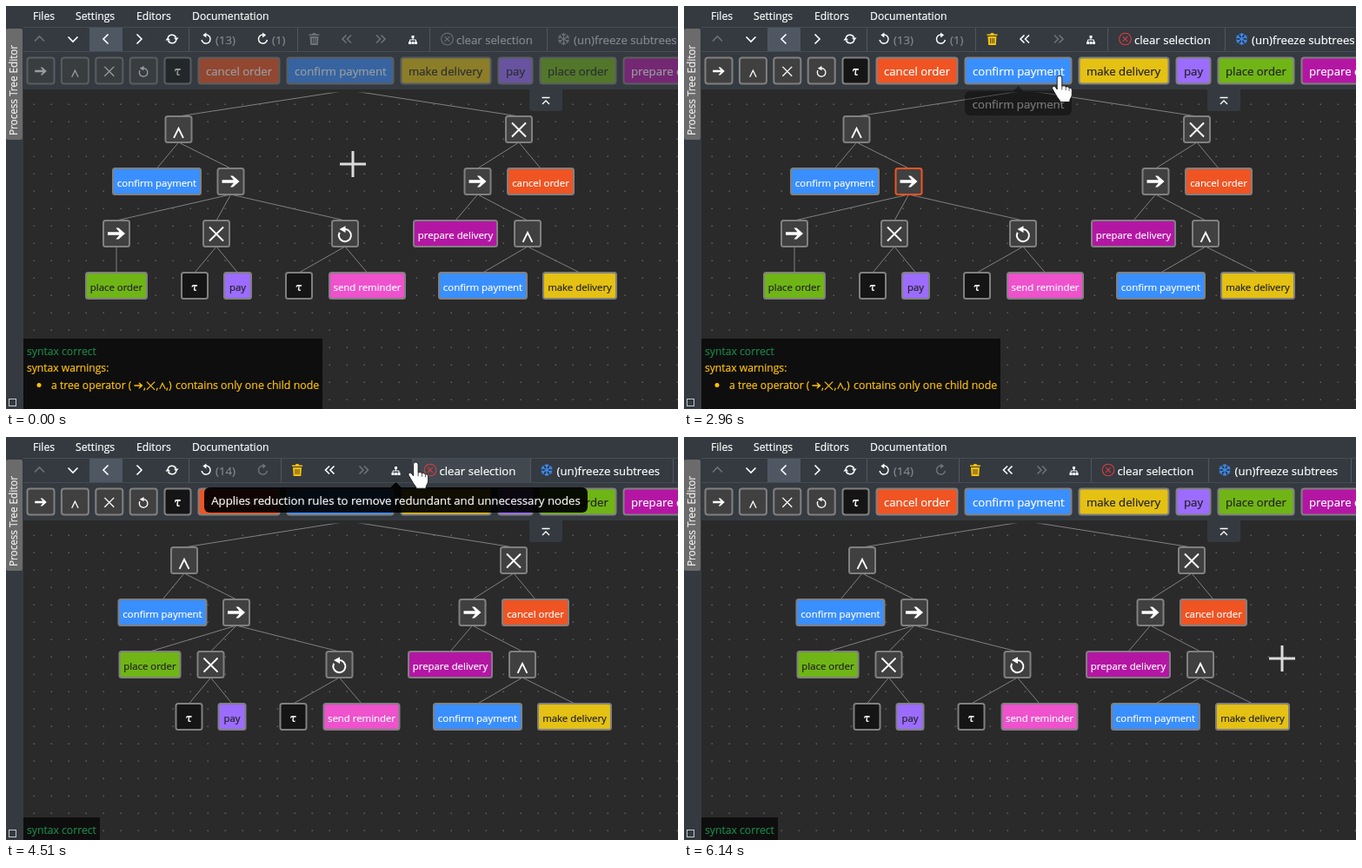
An HTML page for the animation above (7.19 s loop, 773 by 464 pixels).

```html
<!DOCTYPE html>
<html lang="en">
<head>
<meta charset="utf-8">
<title>Process Tree Editor</title>
<style>
html, body { margin: 0; width: 100%; height: 100%; overflow: hidden; background: #2a2a2a; }
svg { display: block; width: 773px; height: 464px; font-family: 'Open Sans', 'Noto Sans', sans-serif; }
</style>
</head>
<body>
<svg id="stage" viewBox="0 0 773 464" xmlns="http://www.w3.org/2000/svg"></svg>
<script>
const LOOP = 7190, STEP = 70;
const CUES = [0, 200, 1400, 1670, 2540, 4310, 4510, 5650];
const BAR = '#343a40', LIT = '#4f5862', GREY = '#808080', DIM = '#6d7277';
const stage = document.getElementById('stage');

// label: [fill, text colour, node width, toolbar x, toolbar width]
const TASKS = {
  'cancel order': ['#f05423', '#fff', 76, 221, 94],
  'confirm payment': ['#3a8fff', '#fff', 101, 323, 123],
  'make delivery': ['#e4c113', '#222', 84, 454, 104],
  'pay': ['#9c6cff', '#222', 31, 566, 40],
  'place order': ['#70b516', '#222', 70, 614, 88],
  'prepare delivery': ['#b416a4', '#fff', 96, 710, 120],
  'send reminder': ['#ee52cc', '#fff', 87]
};

const clamp = v => Math.max(0, Math.min(1, v));
const ramp = (t, a, b) => clamp((t - a) / (b - a));
const mix = (a, b, k) => a + (b - a) * k;
const ease = p => { const q = Math.pow(clamp(p), 0.85); return q * q * (3 - 2 * q); };

const rect = (x, y, w, h, fill, more = '') =>
  `<rect x="${x}" y="${y}" width="${w}" height="${h}" fill="${fill}" ${more}/>`;
const text = (s, x, y, size, fill = '#fff', more = '') =>
  `<text x="${x}" y="${y}" font-size="${size}" fill="${fill}" stroke="${fill}" stroke-width=".2" ${more}>${s}</text>`;
const mid = 'text-anchor="middle"';
const at = (x, y, body, s = 1) => `<g transform="translate(${x} ${y}) scale(${s})">${body}</g>`;
const line = (d, c, w = 1.6) => `<path d="${d}" fill="none" stroke="${c}" stroke-width="${w}"/>`;
const solid = (d, c) => `<path d="${d}" fill="${c}"/>`;
const fade = (o, body) => o > 0 ? `<g opacity="${o}">${body}</g>` : '';

const OPS = {
  seq: c => solid('M-10-1.7H3.4L-.6-6.5H2.6L10 0L2.6 6.5H-.6L3.4 1.7H-10z', c),
  xor: c => line('M-8-7.5L8 8.5M8-7.5L-8 8.5', c, 1.9),
  and: c => line('M-5.4 9.8L0-1.2L5.4 9.8', c, 1.9),
  loop: c => line('M-6.3-1.2A7 7 0 1 0 0-4.9', c, 2) + solid('M-6.5-4.9L.5-8.8V-1z', c)
};

const ICONS = {
  up: c => line('M-5.5 2.5L0-3L5.5 2.5', c),
  down: c => line('M-5.5-2.5L0 3L5.5-2.5', c),
  left: c => line('M2.5-5.5L-3 0L2.5 5.5', c),
  right: c => line('M-2.5-5.5L3 0L-2.5 5.5', c),
  first: c => line('M-.5-4.5L-5 0L-.5 4.5M5-4.5L.5 0L5 4.5', c),
  last: c => line('M.5-4.5L5 0L.5 4.5M-5-4.5L-.5 0L-5 4.5', c),
  sync: c => line('M-4.8-1.2A5 5 0 0 1 4.6-1.6M4.8 1.2A5 5 0 0 1-4.6 1.6', c, 1.5) +
    solid('M2-1.5H7.6L4.8 2zM-2 1.5H-7.6L-4.8-2z', c),
  undo: c => line('M-2.2-4.4A5 5 0 1 1-4.9 1', c, 1.5) + solid('M.4-7.6V-1.4L-3.6-4.5z', c),
  redo: c => `<g transform="scale(-1 1)">${ICONS.undo(c)}</g>`,
  trash: c => solid('M-6-5.5H-2.2L-1.5-7H1.5L2.2-5.5H6V-4H-6zM-5-3H5L4.3 7H-4.3z', c) +
    line('M-2-1V5M0-1V5M2-1V5', BAR, .9),
  tree: c => line('M0-3V0M-3.5 2.5V0H3.5V2.5', c, 1) +
    [[0, -3.5], [-3.5, 3.5], [0, 3.5], [3.5, 3.5]].map(p =>
      rect(p[0] - 1.5, p[1] - 1.5, 3, 3, c)).join(''),
  clear: c => `<circle r="6.8" fill="none" stroke="${c}" stroke-width="1.1"/>` +
    line('M-2.8-2.8L2.8 2.8M2.8-2.8L-2.8 2.8', c, 1.1),
  snow: c => [0, 60, 120].map(a => `<g transform="rotate(${a})">` +
    line('M0-7V7M-2.2-6L0-3.8L2.2-6M-2.2 6L0 3.8L2.2 6', c, 1.2) + '</g>').join('')
};
const icon = (name, x, y, c = '#fff') => at(x, y, ICONS[name](c));

// --- process tree ---
function node(label, x, y, picked) {
  const task = TASKS[label], w = task ? task[2] : 30;
  const fill = task ? task[0] : label === 'τ' ? '#151515' : '#404040';
  const box = rect(x - w / 2, y - 15, w, 30, fill,
    `rx="2.5" stroke="${picked ? '#f05423' : GREY}" stroke-width="2"`);
  if (OPS[label]) return box + at(x, y, OPS[label]('#fff'));
  if (task) return box + text(label, x, y + 6, 11.4, task[1], mid);
  return box + tau(x, y + 6, 13);
}
const tau = (x, y, size) =>
  text('τ', x, y, size, '#fff', mid + ' font-weight="600" style="font-family:\'Noto Serif\',serif"');

// each entry: [label, x, level, parent index]
function treeNodes(reduced) {
  const a = reduced ? 6.5 : 0, b = reduced ? -6.5 : 0, c = reduced ? -6 : 0;
  const list = [
    ['and', 198.5 + a, 0, -1], ['xor', 590 + c, 0, -1],
    ['confirm payment', 173.5 + a, 1, 0], ['seq', 258.5 + a, 1, 0],
    ['xor', 242 + b, 2, 3], ['loop', 390 + b, 2, 3],
    ['τ', 217 + b, 3, 4], ['pay', 266.5 + b, 3, 4],
    ['τ', 337 + b, 3, 5], ['send reminder', 415.5 + b, 3, 5],
    ['seq', 542.5 + c, 1, 1], ['cancel order', 615 + c, 1, 1],
    ['prepare delivery', 517 + c, 2, 10], ['and', 600 + c, 2, 10],
    ['confirm payment', 548.5 + c, 3, 13], ['make delivery', 660 + c, 3, 13]
  ];
  if (reduced) list.push(['place order', 165.5, 2, 3]);
  else list.push(['seq', 127, 2, 3], ['place order', 127, 3, 16]);
  return list;
}

function tree(reduced, picked) {
  const list = treeNodes(reduced), yOf = l => 142 + 60 * l;
  let edges = '', boxes = '';
  list.forEach(([label, x, level, up], i) => {
    const p = list[up], px = p ? p[1] : 394, py = p ? yOf(p[2]) + 15 : 97;
    edges += line(`M${px} ${py}L${x} ${yOf(level) - 15}`, GREY, 1);
    boxes += node(label, x, yOf(level), picked && i === 3);
  });
  return `<g clip-path="url(#view)">${edges}${boxes}</g>`;
}

// --- fixed parts ---
const backdrop = `<defs>
  <pattern id="dots" x="22" y="103" width="20" height="20" patternUnits="userSpaceOnUse">
    <rect x="9.5" y="9.5" width="1.5" height="1.5" fill="#606060"/></pattern>
  <clipPath id="view"><rect x="20" y="99.5" width="753" height="365"/></clipPath></defs>` +
  rect(0, 0, 773, 464, '#2a2a2a') + rect(20, 96, 753, 368, 'url(#dots)');

const frame = rect(0, 0, 773, 96, BAR) + rect(0, 24, 20, 440, BAR) +
  rect(0, 26, 19, 128, '#6b6b6b', 'rx="2"') +
  text('Process Tree Editor', 0, 0, 11.7, '#f0f0f0', 'transform="translate(13 149) rotate(-90)"') +
  rect(3.5, 452.5, 8, 8, 'none', 'stroke="#c8c8c8"') +
  [['Files', 31], ['Settings', 80], ['Editors', 150], ['Documentation', 214]]
    .map(([s, x]) => text(s, x, 16, 12.2)).join('') +
  line('M20 24.5H773M20 52.5H773', '#454c53', 1) +
  solid('M602 96H640V118Q640 121 637 121H605Q602 121 602 118z', BAR) +
  line('M616.5 105.5H625.5M617 113L621 109L625 113', '#fff', 1.3);

function actions(t) {
  const on = t >= 1670, done = t >= 4510, d = done ? -19.5 : 0;
  const pick = (c, off = DIM) => on ? c : off;
  const hoverTree = done ? 0 : ramp(t, 3050, 3200);
  const hoverClear = done ? ramp(t, 4440, 4590) * (1 - ramp(t, 5650, 5860)) : 0;
  const sep = x => line(`M${x}.5 25V52`, '#50575e', 1);
  const label = pick('#fff', '#85898d');
  return rect(96, 25, 38, 27, LIT) +
    fade(hoverTree, rect(449, 25, 38, 27, LIT)) +
    fade(hoverClear, rect(467, 25, 136, 27, LIT)) +
    icon('up', 38.5, 38, DIM) + icon('down', 77, 38) + icon('left', 115, 38) +
    icon('right', 153, 38) + icon('sync', 191, 38) + sep(210) +
    icon('undo', 230, 38) + text(done ? '(14)' : '(13)', 241, 44, 13.2, '#85898d') +
    icon('redo', 295.5, 38, done ? DIM : '#fff') +
    (done ? '' : text('(1)', 306, 44, 13.2, '#85898d')) +
    sep(335 + Math.round(d)) +
    icon('trash', 354.5 + d, 38, pick('#ffc107')) +
    icon('first', 392 + d, 38, pick('#fff')) + icon('last', 431 + d, 38, DIM) +
    icon('tree', 468 + d, 39) + sep(487 + Math.round(d)) +
    icon('clear', 507.5 + d, 38, pick(hoverClear > .5 ? '#ee5a2a' : '#dc3c40')) +
    text('clear selection', 518 + d, 44, 13.2, label) + sep(622 + Math.round(d)) +
    icon('snow', 641.5 + d, 38, pick('#3a8fff')) +
    text('(un)freeze subtrees', 653 + d, 44, 13.2, label) + (done ? sep(767) : '');
}

function palette(t) {
  const button = (x, w, fill) => rect(x + .5, 59.5, w - 1, 30, fill,
    `rx="3" stroke="${GREY}" stroke-width="2"`);
  let out = '';
  ['seq', 'and', 'xor', 'loop'].forEach((k, i) => {
    const x = 24 + 39.4 * i;
    out += button(x, 32, '#404040') + at(x + 16, 75, OPS[k]('#fff'), .68);
  });
  out += button(182, 31, '#151515') + tau(197.5, 80, 14);
  for (const [s, [fill, ink, , x, w]] of Object.entries(TASKS))
    if (x) out += button(x, w, fill) + text(s, x + 9, 80, 13.2, ink);
  return fade(mix(.5, 1, ramp(t, 1630, 1800)), out);
}

function status(reduced) {
  const green = '#1c8449', gold = '#ffc107';
  if (reduced) return rect(20, 438, 88, 26, '#0e0e0e') + text('syntax correct', 24, 457, 12.2, green);
  return rect(20, 383, 344, 81, '#0e0e0e') +
    text('syntax correct', 24, 402, 12.2, green) +
    text('syntax warnings:', 24, 421, 12.1, gold) +
    `<circle cx="38" cy="436.5" r="2.5" fill="${gold}"/>` +
    text('a tree operator (', 52, 441, 12.2, gold) +
    at(152.5, 437, OPS.seq(gold), .5) + text(',', 158, 441, 12.2, gold) +
    at(166.5, 437, OPS.xor(gold), .58) + text(',', 172.5, 441, 12.2, gold) +
    at(180, 435, OPS.and(gold), .6) + text(',)', 184, 441, 12.2, gold) +
    text('contains only one child node', 195, 441, 12.4, gold);
}

// --- overlays ---
const tip = (s, x, w, y, h, o) => fade(o * .93,
  rect(x, y, w, h, '#000', 'rx="6"') +
  solid(`M${x + w / 2 - 6} ${y}h12l-6-6z`, '#000') + text(s, x + w / 2, y + 20, 13.2, '#fff', mid));

function tips(t) {
  const nodeTip = ramp(t, 750, 915) * (1 - ramp(t, 1640, 1800));
  const pay = .9 * ramp(t, 2890, 3050) * (1 - ramp(t, 3100, 3350));
  const rules = ramp(t, 3170, 3360) * (1 - ramp(t, 4620, 4780));
  const clear = ramp(t, 4630, 4780) * (1 - ramp(t, 5690, 5860));
  return fade(nodeTip * .93, rect(243, 150, 31, 30, '#000', 'rx="6"') +
      solid('M252.5 180h12l-6 6z', '#000') + at(258.5, 165, OPS.seq('#fff'), .58)) +
    tip('confirm payment', 323, 123, 98, 28, pay) +
    tip('Applies reduction rules to remove redundant and unnecessary nodes',
      t < 4510 ? 247 : 228, 441, 58, 29, rules) +
    tip('Clear selection', 483, 104, 58, 29, clear);
}

// moves: start, steps, from, bend, to
const MOVES = [
  [200, 11, [399, 182], [329, 196], [259, 209]],
  [2540, 11, [259, 209], [398, 140], [472, 28]],
  [5650, 8, [472, 28], [580, 141], [688, 255]]
];
function pointer(t) {
  let pos = MOVES[0][2];
  for (const [start, n, a, b, c] of MOVES) if (t >= start) {
    const e = ease(((t - start) / STEP + 1) / n);
    pos = a.map((v, i) => mix(mix(v, b[i], e), mix(b[i], c[i], e), e));
  }
  return pos;
}

function cursor(t) {
  const [x, y] = pointer(t);
  const onNode = x > 242 && x < 275 && y > 186 && y < 219;
  const halo = t >= 1400 && t < 1670 || t >= 4310 && t < 4510
    ? '<circle r="18" fill="#ff0" fill-opacity=".47"/>' : '';
  const hand = '<path d="M-3 2.5a2.8 2.8 0 0 1 5.6 0V12c1-1.2 4-.9 4.4.8c1-.9 3.6-.5 3.9 1.2' +
    'c1.2-.7 3.2 0 3.2 2.2v5.5c0 3-2.6 4-2.6 8.3h-11c0-2.4-2.4-3.6-3.8-6.4l-5-8.6' +
    'c-1.2-2.6 1.9-4 3.4-2.2l1.9 2.6z" fill="#fff" stroke="#111" stroke-width=".9"/>' +
    line('M2.6 12v4M7 13v3.5M10.9 14.2v3', '#111', .7);
  const cross = rect(-15, -1.5, 30, 3, '#dcdcdc') + rect(-1.5, -15, 3, 30, '#dcdcdc');
  return at(x, y, halo + (onNode || y < 96 ? at(-.5, 1.2, hand) : cross));
}

function draw(t) {
  const reduced = t >= 4510, picked = t >= 1670 && !reduced;
  stage.innerHTML = backdrop + tree(reduced, picked) + frame + actions(t) +
    palette(t) + status(reduced) + tips(t) + cursor(t);
}

// the picture advances in fixed steps after each cue
function stepped(t) {
  const cue = CUES.filter(c => c <= t).pop();
  return cue + Math.floor((t - cue) / STEP) * STEP;
}

let shown = -1;
const begin = performance.now();
function tick() {
  const t = stepped((performance.now() - begin) % LOOP);
  if (t !== shown) draw(shown = t);
  requestAnimationFrame(tick);
}
tick();
</script>
</body>
</html>
```
